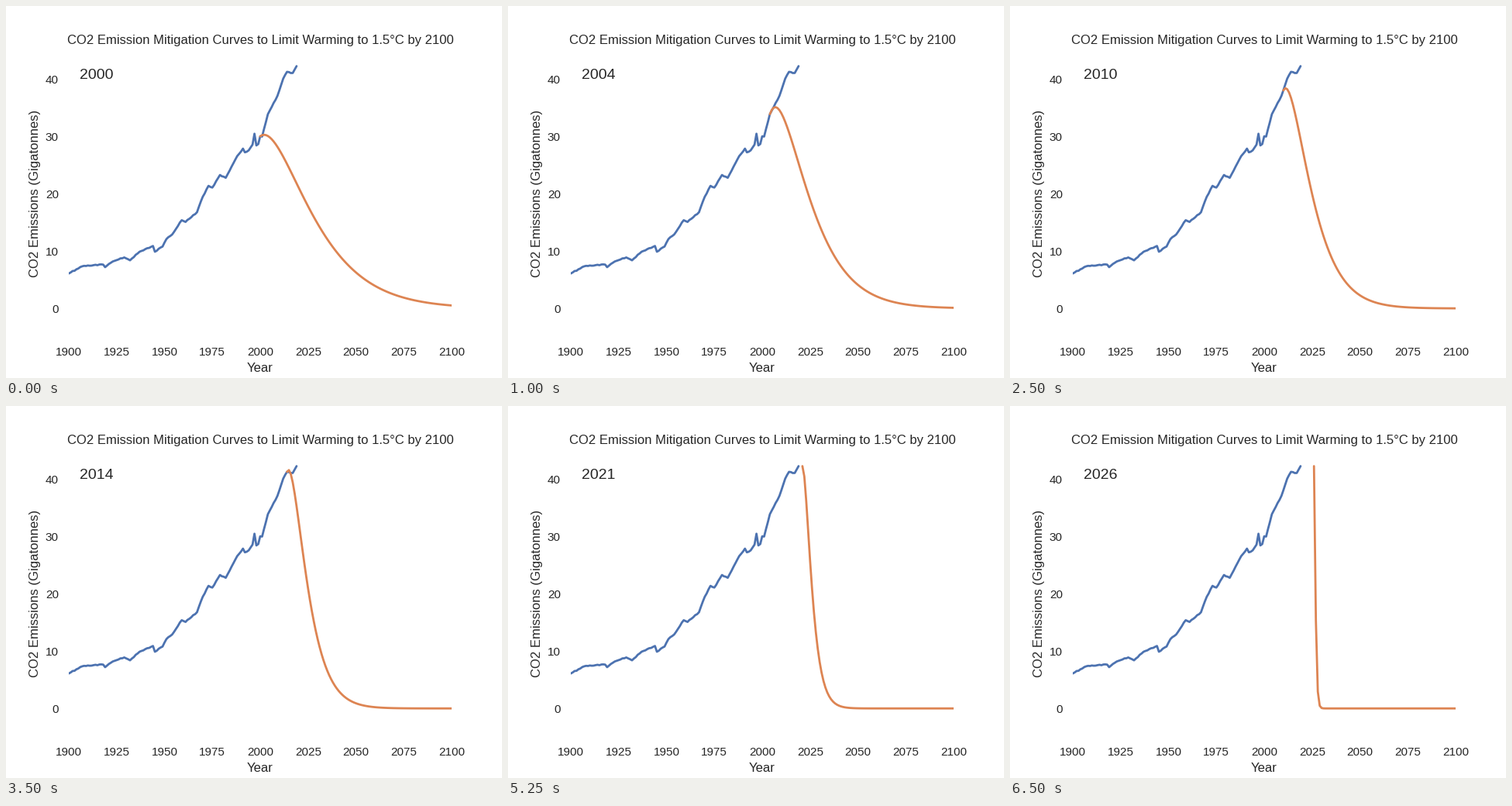
Write a matplotlib script that moves like this. It is 640 px wide and 480 px high and loops after 6.75 s.

```python
import matplotlib.pyplot as plt
import numpy as np
from matplotlib.animation import FuncAnimation

BLUE, ORANGE, INK = "#4C72B0", "#DD8452", "#262626"
FIRST_YEAR, LAST_YEAR = 1900, 2100
START_YEAR, END_YEAR = 2000, 2026
FINAL_QUOTA = 39  # Gt left to emit in END_YEAR

# Turning points of yearly emissions: (year, Gt).
TURNS = [
    (1900, 6.1), (1907, 7.35), (1918, 7.65), (1919, 7.2), (1923, 8.2),
    (1929, 8.9), (1932, 8.4), (1937, 9.9), (1944, 10.9), (1945, 9.9),
    (1949, 10.8), (1951, 12.1), (1954, 12.9), (1959, 15.4), (1961, 15.1),
    (1967, 16.8), (1970, 19.5), (1973, 21.4), (1975, 21.1), (1979, 23.3),
    (1982, 22.8), (1988, 26.6), (1991, 27.9), (1992, 27.25), (1994, 27.6),
    (1996, 28.6), (1997, 30.5), (1998, 28.45), (1999, 28.7), (2000, 30.05),
    (2001, 30.0), (2004, 33.9), (2009, 37.1), (2012, 40.1), (2014, 41.3),
    (2017, 41.1), (2019, 42.3),
]


def build_emissions():
    """Yearly values through the turning points, flat after the last one."""
    turn_years, turn_values = zip(*TURNS)
    years = np.arange(FIRST_YEAR, END_YEAR + 1)
    wobble = np.random.default_rng(4).uniform(-0.08, 0.08, len(years))
    wobble[np.isin(years, turn_years) | (years > turn_years[-1])] = 0
    return years, np.interp(years, turn_years, turn_values) + wobble


def mitigation_curve(year):
    """Pathway from the given year that just uses up the remaining quota."""
    i = year - FIRST_YEAR
    start = emissions[i]
    quota = FINAL_QUOTA + emissions[i + 1:].sum()
    rate = growth[i - 6:i - 1].mean()
    span = quota / start
    decay = (1 + np.sqrt(1 + rate * span)) / span
    t = np.arange(LAST_YEAR - year + 1)
    return year + t, start * (1 + (rate + decay) * t) * np.exp(-decay * t)


years, emissions = build_emissions()
growth = np.diff(emissions) / emissions[:-1]
recorded = years <= TURNS[-1][0]

plt.rcParams.update({
    "font.family": "Liberation Sans",
    "text.color": INK,
    "axes.labelcolor": INK,
    "lines.linewidth": 2,
    "lines.solid_capstyle": "round",
})

fig, ax = plt.subplots(figsize=(6.4, 4.8), dpi=100)
fig.subplots_adjust(left=0.1265, right=0.8985, bottom=0.11, top=0.88)
ax.set(xlim=(FIRST_YEAR, LAST_YEAR), ylim=(-5, 45),
       xticks=range(FIRST_YEAR, LAST_YEAR + 1, 25), yticks=range(0, 41, 10))
ax.spines[:].set_visible(False)
ax.tick_params(length=6, pad=3.5, labelsize=11, labelcolor=INK,
               bottom=False, left=False)
ax.set_title("CO2 Emission Mitigation Curves to Limit Warming to 1.5°C by 2100",
             fontsize=12)
ax.set_xlabel("Year", fontsize=12)
ax.set_ylabel("CO2 Emissions (Gigatonnes)", fontsize=12)

ax.plot(years[recorded], emissions[recorded], color=BLUE)
pathway, = ax.plot([], [], color=ORANGE)
year_label = ax.text(0.0275, 0.902, "", transform=ax.transAxes, fontsize=14)


def update(frame):
    year = START_YEAR + frame
    pathway.set_data(*mitigation_curve(year))
    year_label.set_text(str(year))
    return pathway, year_label


anim = FuncAnimation(fig, update, frames=END_YEAR - START_YEAR + 1,
                     interval=250, repeat=True, repeat_delay=0)
plt.show()
```
